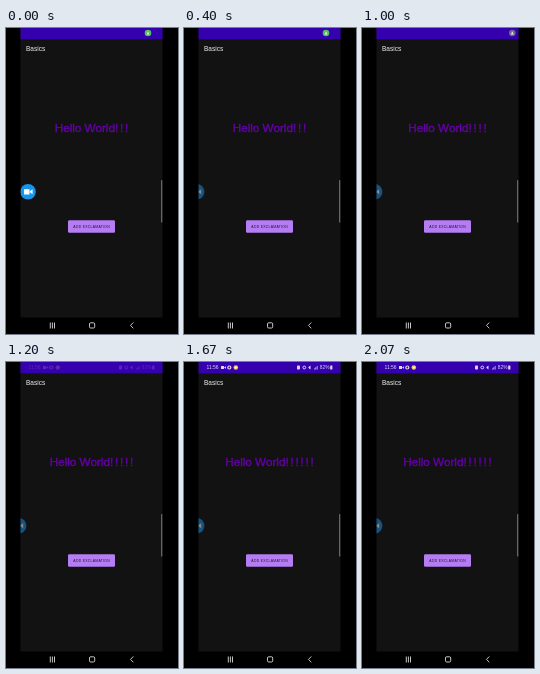
Write an HTML page that moves like this. It is 172 by 306 pixels and loops after 2.59 s.

```html
<!DOCTYPE html>
<html lang="en">
<head>
<meta charset="utf-8">
<style>
  html, body { margin: 0; width: 100%; height: 100%; overflow: hidden; background: #000; }
  svg { display: block; width: 100vw; height: 100vh; }
  text { font-family: "Liberation Sans", Arial, sans-serif; }
</style>
</head>
<body>
<svg viewBox="0 0 172 306">
  <defs><clipPath id="screen"><rect x="14.5" width="142" height="306"/></clipPath></defs>
  <rect width="172" height="306" fill="#000"/>
  <rect x="14.5" width="142" height="289.5" fill="#121212"/>
  <rect x="14.5" width="142" height="11.3" fill="#3500ad"/>

  <g id="status" fill="#ddd8f0">
    <text x="22.5" y="7.4" font-size="5">11:56</text>
    <path d="M37 4h3v3h-3zM40 5.5l2-1.3v2.6z"/>
    <circle cx="45.3" cy="5.5" r="2.1"/>
    <circle cx="45.3" cy="5.5" r=".9" fill="#3500ad"/>
    <circle cx="51.8" cy="5.5" r="2.3" fill="#e5c66a"/>
    <circle cx="51.8" cy="5.5" r="1" fill="#fff"/>
    <rect x="113" y="3.5" width="3" height="4" rx=".8"/>
    <circle cx="120.3" cy="5.5" r="1.4" fill="none" stroke="#ddd8f0"/>
    <path d="M124.5 5l2-1.5v4l-2-1.5zM130 7.5v-1h.8v1zM131.4 7.5V5.2h.8v2.3zM132.8 7.5V4h.7v3.5z"/>
    <text x="135.8" y="7.4" font-size="4.8">82%</text>
    <rect x="146.2" y="3.6" width="2.2" height="4" rx=".5"/>
  </g>
  <g id="chip">
    <circle id="chipDisc" r="3.3"/>
    <path d="M-1.4 1.4L0-1.7 1.4 1.4z" fill="#dff3df"/>
  </g>

  <text x="20" y="23.2" font-size="6.5" fill="#f0f0f0">Basics</text>
  <text x="86.3" y="104.2" font-size="11.7" fill="#6400a8" stroke="#6400a8" stroke-width=".35" text-anchor="middle">Hello World<tspan id="marks" letter-spacing="1.75"></tspan></text>

  <rect id="button" x="62" y="192.2" width="47" height="12.5" rx="1.3"/>
  <text x="85.7" y="199.9" font-size="3.4" letter-spacing=".3" fill="#21122f" text-anchor="middle">ADD EXCLAMATION</text>
  <rect x="155" y="152" width="1.3" height="42.5" rx=".6" fill="#666"/>

  <g clip-path="url(#screen)">
    <g id="bubble">
      <circle r="7.8" fill="#1795eb"/>
      <path d="M-4-2.6h5.5v5.2H-4zM1.9-.5L4.6-2.5v5L1.9.5z" fill="#fff"/>
    </g>
  </g>

  <g fill="none" stroke="#ddd" stroke-width=".9">
    <path d="M44.3 294.5v6M46.4 294.5v6M48.5 294.5v6"/>
    <rect x="83.5" y="294.8" width="5.2" height="5.2" rx="1.2"/>
    <path d="M127.3 294.5l-2.8 2.9 2.8 2.9"/>
  </g>
</svg>
<script>
  const LOOP = 2590;
  const TAPS = [0, 670, 1200, 1670];
  const el = id => document.getElementById(id);
  const ramp = (t, from, to) => Math.min(1, Math.max(0, (t - from) / (to - from)));
  const ease = p => p * p * (3 - 2 * p);
  const mix = (a, b, p) => `rgb(${a.map((v, i) => Math.round(v + (b[i] - v) * p))})`;

  const ripple = age => ramp(age, 30, 110) * (1 - ramp(age, 220, 330));

  function draw(t) {
    const done = TAPS.filter(tap => t >= tap);
    el("marks").textContent = "!".repeat(2 + done.length);

    const press = ripple(t - done[done.length - 1]);
    el("button").setAttribute("fill", mix([181, 124, 243], [143, 99, 194], press));

    const slide = ease(ramp(t, 40, 280));
    el("bubble").setAttribute("transform", `translate(${22 - 9.4 * slide} 163.8)`);
    el("bubble").setAttribute("opacity", 1 - 0.5 * ramp(t, 140, 390));

    const leave = ease(ramp(t, 850, 990));
    el("chip").setAttribute("transform", `translate(${142 + 8.3 * leave} 5)`);
    el("chip").setAttribute("opacity", 1 - ramp(t, 1010, 1120));
    el("chipDisc").setAttribute("fill", mix([82, 190, 92], [112, 105, 140], leave));

    el("status").setAttribute("opacity", ramp(t, 1170, 1330));
  }

  const start = performance.now();
  function tick() {
    draw((performance.now() - start) % LOOP);
    requestAnimationFrame(tick);
  }
  tick();
</script>
</body>
</html>
```
